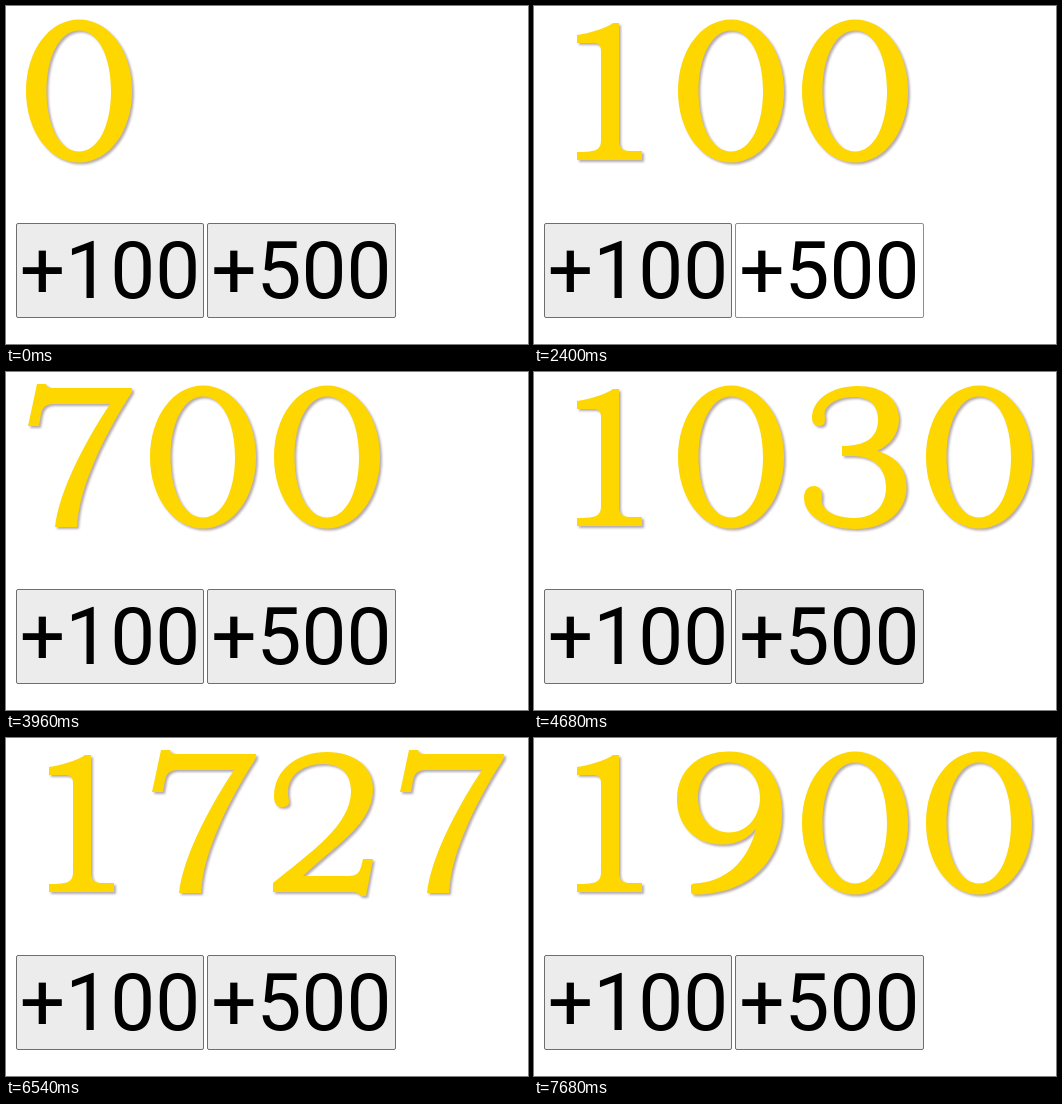
An HTML page for the animation above (8220 ms loop, 522 px wide and 338 px high).

```html
<!DOCTYPE html>
<html lang="en">
<head>
<meta charset="utf-8">
<title>Score counter</title>
<style>
  html, body { margin: 0; width: 100%; height: 100%; overflow: hidden; background: #fff; }
  svg { display: block; }
  #score { fill: #ffd700; fill-rule: evenodd; filter: drop-shadow(2px 2px 1.2px rgba(110, 90, 100, .5)); }
  .button rect { fill: #ececec; stroke: #6e6e6e; }
  .button.hover rect { fill: #e8e8e8; }
  .button.active rect { fill: #fff; stroke: #8d8d8d; }
  .button text { font: 80px Roboto, Arial, sans-serif; }
</style>
</head>
<body>
<svg width="522" height="338" viewBox="0 0 522 338">
  <g id="score" role="img"></g>
  <g class="button" id="add100">
    <rect x="10.5" y="217.5" width="187" height="94" rx="1.5"/>
    <text x="104" y="292" text-anchor="middle">+100</text>
  </g>
  <g class="button" id="add500">
    <rect x="201.5" y="217.5" width="188" height="94" rx="1.5"/>
    <text x="295.3" y="292" text-anchor="middle">+500</text>
  </g>
</svg>
<script>
const LOOP = 8220, TICK = 60, LAST_TICK = 9, ADVANCE = 124;

const six = 'M110 14Q113 14 113 17V22Q113 25 110 25C80 26 56 46 48 80C56 70 67 64 82 64C109 64 127 83 127 109C127 138 106 157 75 157C42 157 22 133 22 95C22 45 57 14 110 14ZM75 76C57 76 44 92 44 111S57 146 75 146 106 131 106 111 93 76 75 76Z';

// Outlines of a wide book face, one per digit.
const glyphs = [
  'M73 13.5C103 13.5 126 45 126 85S103 156.5 73 156.5 20 125 20 85 43 13.5 73 13.5ZM73 24.5C54 24.5 40.5 50 40.5 85S54 145.5 73 145.5 105 120 105 85 92 24.5 73 24.5Z',
  'M43 29C55 27 70 23 79 17H85V134Q85 145 95 145H108V154H43V146C60 146 67 145 67 134V45Q67 37 60 37H43Z',
  'M20 58C20 32 43 14 73 14C101 14 119 29 119 51C119 87 80 108 49 138H95Q105 138 107 129L109 121H119L112 158H106Q105 154 98 154H19V145C57 114 97 87 97 53C97 36 87 26 69 26C48 26 34 38 34 54C34 59 35 61 35 64C35 68 32 69 28 69C23 69 20 66 20 58Z',
  'M30 46C30 28 49 14 75 14C101 14 117 27 117 47C117 62 108 73 95 79C114 84 124.5 97 124.5 115C124.5 140 103 157 74 157C45 157 22 144 22 126C22 118 26 114 32 114C37 114 40 118 40 123C40 128 39 130 41 134C45 141 57 146 72 146C92 146 104 134 104 115C104 96 91 84 71 84H60V74C84 74 96 65 96 48C96 34 88 25 72 25C57 25 46 31 43 39C42 42 43 44 43 47C43 52 41 54 37 54C33 54 30 51 30 46Z',
  'M82 16H97V107H124V119H97V134Q97 145 106 145H117V154H60V145H68Q78 145 78 134V119H18V109ZM78 41L34 107H78Z',
  'M41 17H101Q107 17 108 12H116L113 33H51L48 72C57 67 67 65 79 65C108 65 126 83 126 108C126 138 104 157 71 157C44 157 27 144 27 127C27 119 31 115 37 115C43 115 46 119 46 124C46 129 45 131 47 135C51 142 59 146 71 146C92 146 105 130 105 109C105 89 93 77 74 77C62 77 53 80 48 86H36Z',
  six,
  'M31 12H40Q41 16 47 16H126V20C111 43 95 72 85 98C76 120 72 138 71 155H49C53 120 77 73 104 32H46Q37 32 35 42L33 54H22Z',
  'M73 13C100 13 116 27 116 47C116 60 107 69 94 77C114 85 125 97 125 115C125 140 104 157 73 157C42 157 21 142 21 118C21 102 31 90 50 80C36 72 28 62 28 48C28 27 46 13 73 13ZM73 24C57 24 47 32 47 44C47 58 62 65 82 72C92 66 97 58 97 47C97 33 88 24 73 24ZM62 86C47 94 41 104 41 118C41 135 54 146 73 146C92 146 105 137 105 122C105 104 88 96 62 86Z',
  six
];

// Each count: start time, starting score, points added, share shown on the first tick.
const counts = [
  [600, 0, 100, .06], [2460, 100, 500, .03], [3420, 600, 100, .06], [4320, 700, 500, .03],
  [5280, 1200, 500, .03], [6420, 1700, 100, .06], [7140, 1800, 100, .06]
];

const buttons = [
  { id: 'add100', active: [[300, 600], [3360, 3420], [6360, 6420], [7080, 7140]], hover: [[5280, 6120], [7020, 7680]] },
  { id: 'add500', active: [[2400, 2460], [4260, 4320], [5220, 5280]], hover: [[4320, 5220], [7020, 7680]] }
];

const score = document.getElementById('score');
let shown = -1;

function scoreAt(time) {
  const count = counts.findLast(([start]) => time >= start);
  if (!count) return 0;
  const [start, from, gain, first] = count;
  const tick = Math.floor((time - start) / TICK);
  return Math.round(from + gain * (tick < LAST_TICK ? first + .105 * tick : 1));
}

function drawScore(value) {
  if (value === shown) return;
  shown = value;
  score.setAttribute('aria-label', value);
  score.innerHTML = [...String(value)].map((digit, i) => {
    const turn = digit === '9' ? ' rotate(180 73 85.3)' : '';
    return `<path transform="translate(${i * ADVANCE})${turn}" d="${glyphs[digit]}"/>`;
  }).join('');
}

const within = (spans, time) => spans.some(([from, to]) => time >= from && time < to);

function draw(now) {
  const time = now % LOOP;
  drawScore(scoreAt(time));
  for (const { id, active, hover } of buttons) {
    const { classList } = document.getElementById(id);
    classList.toggle('active', within(active, time));
    classList.toggle('hover', within(hover, time));
  }
}

const begin = performance.now();
function loop() {
  draw(performance.now() - begin);
  requestAnimationFrame(loop);
}
loop();
</script>
</body>
</html>
```
